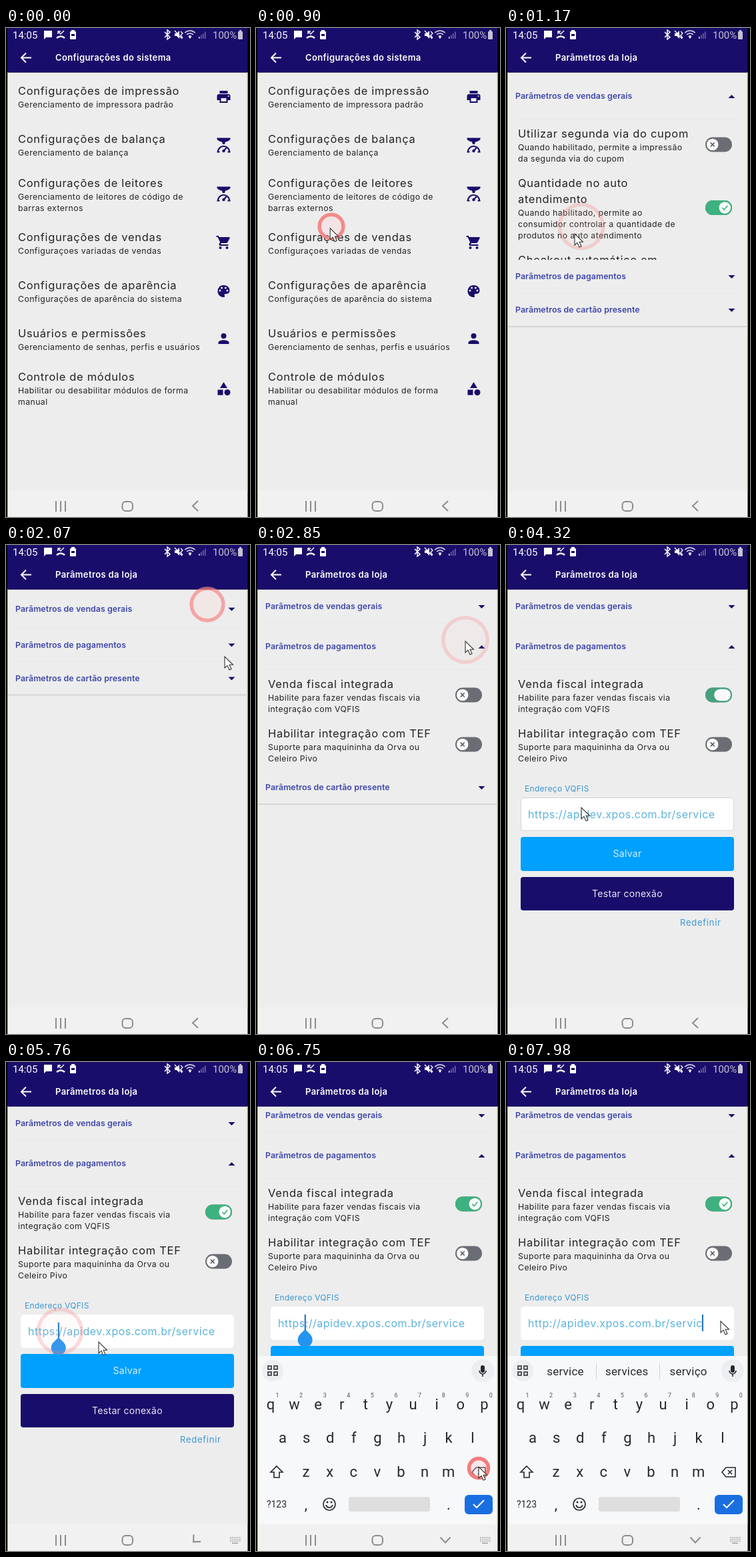
These frames come from a looping animation (366 by 732 pixels, 8000 ms). An HTML page with a canvas:

```html
<!DOCTYPE html>
<html lang="pt-BR">
<head>
<meta charset="utf-8">
<title>Parâmetros da loja</title>
<style>
html, body { margin: 0; width: 100%; height: 100%; overflow: hidden; background: #000; }
canvas { display: block; width: 366px; height: 732px; }
</style>
</head>
<body>
<canvas id="stage" width="366" height="732"></canvas>
<script>
const ctx = document.getElementById('stage').getContext('2d');
const LOOP = 8000;
const LEFT = 2, WIDTH = 360.5, BAR = 66.5;
const NAVY = '#190d6b', PAGE = '#ededed', INK = '#242424', LINK = '#3f48ab', BLUE = '#00a0ff';

const STYLES = {
  title: ['400 16.5px Inter, sans-serif', 0.68],
  sub: ['400 12.3px Inter, sans-serif', 0.41],
  bar: ['600 13px Inter, sans-serif', 0.38],
  panel: ['600 12.4px Inter, sans-serif', 0.06],
  label: ['400 12px Inter, sans-serif', 0.3],
  input: ['400 16px Inter, sans-serif', 0.5],
  button: ['400 14px Inter, sans-serif', 0.3],
  link: ['400 13px Inter, sans-serif', 0.75],
  status: ['400 15px Roboto, sans-serif', 0],
  suggest: ['400 17px Roboto, sans-serif', 0.2],
  key: ['400 22px Roboto, sans-serif', 0],
  small: ['400 14px Roboto, sans-serif', 0],
  hint: ['400 9px Roboto, sans-serif', 0]
};

// Timing
const clamp = v => Math.max(0, Math.min(1, v));
const lerp = (a, b, k) => a + (b - a) * k;
const linear = (t, from, to) => clamp((t - from) / (to - from));
const ease = (t, from, to) => { const k = linear(t, from, to); return k * k * (3 - 2 * k); };

const POINTER = [
  [480, 30, 298], [570, 112, 300], [720, 112, 300], [840, 112, 299], [1170, 103, 308],
  [1400, 112, 300], [1850, 302, 89], [1900, 302, 89], [2070, 328, 167], [2300, 326, 164],
  [2510, 314, 143], [2850, 314, 144], [3300, 318, 222], [3800, 318, 224], [4320, 113, 393],
  [4740, 75, 400], [5430, 77, 400], [5760, 139, 419], [6510, 139, 419], [6700, 334, 606],
  [6900, 334, 606], [7300, 304, 390], [7450, 304, 390], [7980, 322, 388]
];
const CLICKS = [
  [840, 113, 297], [1900, 302, 89], [2510, 314, 142], [3760, 318, 224],
  [5430, 81, 403], [6750, 334, 608], [7330, 304, 391]
];

// Drawing helpers
function group(draw, alpha = 1) {
  ctx.save();
  ctx.globalAlpha *= alpha;
  draw();
  ctx.restore();
}
function clipped(x, y, w, h, draw, alpha) {
  group(() => { ctx.beginPath(); ctx.rect(x, y, w, h); ctx.clip(); draw(); }, alpha);
}
function box(x, y, w, h, color, r = 0) {
  ctx.fillStyle = color;
  ctx.beginPath();
  ctx.roundRect(x, y, w, h, r);
  ctx.fill();
}
function disc(x, y, r, color) {
  ctx.fillStyle = color;
  ctx.beginPath();
  ctx.arc(x, y, r, 0, 7);
  ctx.fill();
}
function ring(x, y, r, color, width = 1.5, from = 0, to = Math.PI * 2) {
  ctx.strokeStyle = color;
  ctx.lineWidth = width;
  ctx.beginPath();
  ctx.arc(x, y, r, from, to);
  ctx.stroke();
}
function shape(d, x, y, color, scale = 1) {
  group(() => { ctx.translate(x, y); ctx.scale(scale, scale); ctx.fillStyle = color; ctx.fill(new Path2D(d)); });
}
function stroke(d, x, y, color, width = 2) {
  group(() => {
    ctx.translate(x, y);
    ctx.strokeStyle = color;
    ctx.lineWidth = width;
    ctx.stroke(new Path2D(d));
  });
}
function setStyle(name) {
  [ctx.font, ctx.letterSpacing] = [STYLES[name][0], STYLES[name][1] + 'px'];
}
// y is the optical middle of the line
function text(str, x, y, style, color = INK, align = 'left') {
  setStyle(style);
  ctx.fillStyle = color;
  ctx.textAlign = align;
  ctx.textBaseline = 'alphabetic';
  ctx.fillText(str, x, y + parseFloat(STYLES[style][0].slice(4)) * 0.36);
}

// Menu icons, drawn around their centre
const ICONS = {
  print(x, y) {
    shape('M-6 -9H6V-5H-6ZM-10 -1Q-10 -4 -7 -4H7Q10 -4 10 -1V5H6V9H-6V5H-10Z', x, y, NAVY);
    box(x - 4, y + 2, 8, 5, PAGE);
    disc(x + 7, y - 1, 1, PAGE);
  },
  scale(x, y) {
    shape('M-10 -10.5H10V-8.5Q8 -5.5 2.5 -4.5L1.5 -1H-1.5L-2.5 -4.5Q-8 -5.5 -10 -8.5Z', x, y, NAVY);
    stroke('M-9 11.5A9 9.5 0 0 1 9 11.5M0 9L4 4.5M-10 10.5H-6M6 10.5H10', x, y, NAVY, 2.2);
    disc(x, y + 9, 2.2, NAVY);
  },
  cart(x, y) {
    shape('M-11 -10V-8H-9L-5.4 -.4L-6.8 2C-7.5 3.4 -6.5 5 -5 5H7V3H-4.6L-3.5 1H3.9Q5.2 1 5.7 0L9.2 -6.5Q9.6 -8 8.4 -8H-6.8L-7.7 -10Z', x, y, NAVY);
    disc(x - 5, y + 8, 2, NAVY);
    disc(x + 5, y + 8, 2, NAVY);
  },
  palette(x, y) {
    shape('M0 -9C-12 -9 -12 9 0 9C3 9 1 6.5 1 5.5Q1 4 3 4H4C8 4 9 1 9 -1C9 -6 5 -9 0 -9Z', x, y, NAVY);
    for (const [dx, dy] of [[-5.5, -1], [-2.8, -5], [2.8, -5], [5.5, -1]]) disc(x + dx, y + dy, 1.5, PAGE);
  },
  person(x, y) {
    disc(x, y - 4, 4, NAVY);
    shape('M-8 8V6C-8 1 8 1 8 6V8Z', x, y, NAVY);
  },
  category(x, y) {
    shape('M0 -10L5.5 -1H-5.5ZM-9 1.5H-1V9.5H-9Z', x, y, NAVY);
    disc(x + 5.5, y + 5.5, 4.5, NAVY);
  }
};

const MENU = [
  [94, 103, 'print', 'Configurações de impressão', 'Gerenciamento de impressora padrão'],
  [166, 175, 'scale', 'Configurações de balança', 'Gerenciamento de balança'],
  [232, 248, 'scale', 'Configurações de leitores', 'Gerenciamento de leitores de código de', 'barras externos'],
  [313, 321, 'cart', 'Configurações de vendas', 'Configuraçoes variadas de vendas'],
  [385, 394, 'palette', 'Configurações de aparência', 'Configurações de aparência do sistema'],
  [457, 465, 'person', 'Usuários e permissões', 'Gerenciamento de senhas, perfis e usuários'],
  [522, 540, 'category', 'Controle de módulos', 'Habilitar ou desabilitar módulos de forma', 'manual']
];

function appBar(title) {
  box(LEFT, 0, WIDTH, BAR, NAVY);
  stroke('M16 0H1M8 -7L1 0L8 7', 22, 44.5, '#fff', 2);
  text(title, 74, 44.5, 'bar', '#fff');
}

function statusBar() {
  text('14:05', 10, 10.5, 'status', '#fff');
  shape('M-6 -6H6V4H-3L-6 7Z', 63, 10, '#fff');
  stroke('M-4 -5L0 -1L5 -6M-4 -1V-5H0', 82, 10, '#fff', 1.4);
  stroke('M-6 5Q0 0 6 5', 82, 10, '#fff', 2.6);
  box(96, 5, 9, 12, '#fff', 1);
  box(98, 3, 5, 3, '#fff');
  box(98, 9, 5, 3, NAVY);
  stroke('M-4 -4L4 4L0 7V-7L4 -4L-4 4', 242, 10, '#fff', 1.5);
  shape('M-6 -2H-3L1 -6V6L-3 2H-6Z', 259, 10, '#fff');
  stroke('M-6 -6L5 6M3 -5L6 -2L3 1L6 5', 259, 10, '#fff', 1.3);
  for (const r of [3, 7, 11]) ring(276, 15, r, '#d8d6e6', 1.6, -2.35, -0.8);
  disc(276, 14, 1.5, '#fff');
  for (let i = 0; i < 4; i++) box(289 + i * 3, 13 - i * 2.5, 1.6, 3 + i * 2.5, i < 1 ? '#ccc' : '#6c659c');
  text('100%', 310, 10.5, 'status', '#c4c2cf');
  box(348, 5, 7, 12, '#c4c2cf', 1);
  box(350, 3, 3, 3, '#c4c2cf');
}

function menuPage() {
  box(LEFT, BAR, WIDTH, 692 - BAR, PAGE);
  for (const [y, iconY, icon, title, ...subs] of MENU) {
    text(title, 18, y, 'title');
    subs.forEach((line, i) => text(line, 18, y + 21 + i * 17, 'sub'));
    ICONS[icon](326.5, iconY);
  }
  appBar('Configurações do sistema');
}

function toggle(x, y, on) {
  box(x - 20, y - 11, 40, 22, '#6b6d75', 11);
  group(() => box(x - 20, y - 11, 40, 22, '#3db17f', 11), on);
  const left = lerp(x - 18, x + 0.5, clamp(on * 1.6 - 0.6));
  const right = lerp(x - 0.5, x + 18, clamp(on * 1.6));
  box(left, y - 8.75, right - left, 17.5, '#fafafa', 8.75);
  const mid = (left + right) / 2;
  if (on < 0.3) stroke('M-3 -3L3 3M3 -3L-3 3', mid, y, '#55575f', 1.6);
  if (on > 0.9) stroke('M-4 0L-1 3L4 -3', mid, y, '#3db17f', 1.6);
}

function setting(y, titles, subs, on) {
  const extra = 24 * (titles.length - 1);
  titles.forEach((line, i) => text(line, 18, y + i * 24.5, 'title'));
  subs.forEach((line, i) => text(line, 18, y + extra + 21 + i * 17, 'sub'));
  if (on !== undefined) toggle(319, y + (extra ? 37 : 16.5), on);
}

function panelHeader(name, y, turn) {
  text(name, 14, y, 'panel', LINK);
  group(() => {
    ctx.translate(338.5, y + 0.5);
    ctx.rotate(-Math.PI * turn);
    shape('M-5 -2.5H5L0 2.5Z', 0, 0, NAVY);
  });
}

function addressForm(t, y) {
  let value = 'https://apidev.xpos.com.br/service';
  if (t >= 6780) value = value.replace('s:', ':');
  if (t >= 7800) value = value.slice(0, -1);
  const focused = t >= 5500;
  text('Endereço VQFIS', 28, y, 'label', '#3a97d3');
  box(22, y + 13, 320, 50, focused ? '#fff' : '#d5d5d5', 5);
  box(23, y + 14, 318, 48, '#fff', 4);
  text(value, 33, y + 38, 'input', '#5cb3dc');
  if (focused) {
    const at = t >= 7400 ? value.length : t >= 6780 ? 4 : t >= 6300 ? 5 : 6;
    setStyle('input');
    const x = 33 + ctx.measureText(value.slice(0, at)).width;
    box(x - 1, y + 25, 2.2, 25, '#2878c0');
    if (t < 6780) {
      shape('M0 -16C4 -11 11 -8 11 0A11 11 0 0 1 -11 0C-11 -8 -4 -11 0 -16Z', x, y + 63, '#2494ee');
    }
  }
  box(22, y + 72, 320, 51, BLUE, 4);
  text('Salvar', 182, y + 97, 'button', '#d5efff', 'center');
  box(22, y + 132, 320, 50, NAVY, 4);
  text('Testar conexão', 182, y + 157, 'button', '#e8e6f4', 'center');
  text('Redefinir', 261, y + 200, 'link', '#3a97d3');
}

function storePage(t) {
  const head1 = 1 - ease(t, 1960, 2150), shown1 = 1 - ease(t, 1900, 2060);
  const open2 = ease(t, 2570, 2770);
  const form = ease(t, 4020, 4240);
  const fiscal = linear(t, 4080, 4400);
  const body1 = 210 * shown1, body2 = open2 * lerp(151, 383, form);
  const scroll = -12 * ease(t, 5800, 6030);

  box(LEFT, BAR, WIDTH, 692 - BAR, PAGE);
  group(() => {
    ctx.translate(0, scroll);
    panelHeader('Parâmetros de vendas gerais', 92 + 10 * head1, shown1);
    const top1 = 117 + 20 * head1, top2 = top1 + body1;
    box(14, top1 - 1, 338, 1, '#e7e7e7');
    if (body1 > 0) clipped(3, top1, 360, body1, () => {
      setting(top1 + 21, ['Utilizar segunda via do cupom'],
        ['Quando habilitado, permite a impressão', 'da segunda via do cupom'], 0);
      setting(top1 + 95, ['Quantidade no auto', 'atendimento'],
        ['Quando habilitado, permite ao', 'consumidor controlar a quantidade de', 'produtos no auto atendimento'], 1);
      setting(top1 + 210, ['Checkout automático em'], []);
    });

    panelHeader('Parâmetros de pagamentos', top2 + 25 + 10 * open2, open2);
    const start = top2 + 50 + 20 * open2, end = start + body2;
    box(14, start - 1, 338, 1, '#e7e7e7');
    if (body2 > 0) clipped(3, start, 360, body2, () => {
      setting(start + 21, ['Venda fiscal integrada'],
        ['Habilite para fazer vendas fiscais via', 'integração com VQFIS'], fiscal);
      setting(start + 95, ['Habilitar integração com TEF'],
        ['Suporte para maquininha da Orva ou', 'Celeiro Pivo'], 0);
      if (form > 0) group(() => addressForm(t, start + 178), form);
    });
    if (form < 1) group(() => {
      panelHeader('Parâmetros de cartão presente', end + 25, 0);
      box(LEFT, end + 49, WIDTH, 2, '#d6d6d6');
    }, 1 - form);
  });
  appBar('Parâmetros da loja');
}

function keyboard(t) {
  const rise = ease(t, 5790, 6010);
  if (!rise) return;
  const dark = '#26282c';
  clipped(LEFT, BAR, WIDTH, 692 - BAR, () => {
    ctx.translate(0, 252 * (1 - rise));
    box(LEFT, 440, WIDTH, 252, '#f7f8fa');
    disc(25, 462, 16, '#eceef1');
    disc(340, 462, 17, '#eceef1');
    for (const dx of [0, 9]) for (const dy of [0, 9]) stroke('M0 0H5V5H0Z', 18 + dx, 455 + dy, dark, 1.5);
    box(337, 454, 6, 11, dark, 3);
    stroke('M-5 0A5 5 0 0 0 5 0M0 5V9', 340, 462, dark, 1.6);
    if (t >= 7420) {
      ['service', 'services', 'serviço'].forEach((word, i) => text(word, 89 + i * 92.3, 463, 'suggest', dark, 'center'));
      box(135, 451, 1, 24, '#cfd1d5');
      box(230, 451, 1, 24, '#cfd1d5');
    }
    const row = (keys, x, y) => [...keys].forEach((k, i) => text(k, x + i * 35.6, y, 'key', dark, 'center'));
    row('qwertyuiop', 22, 512);
    row('asdfghjkl', 40, 562);
    row('zxcvbnm', 75, 613);
    [...'1234567890'].forEach((n, i) => text(n, 32 + i * 35.6, 499, 'hint', '#555', 'center'));
    stroke('M0 -9L9 0H4V8H-4V0H-9Z', 31, 614, dark, 1.6);
    stroke('M-10 0L-4 -7H10V7H-4ZM-1 -3L5 3M5 -3L-1 3', 334, 614, dark, 1.6);
    text('?123', 31, 662, 'small', dark, 'center');
    text(',', 75, 662, 'key', dark, 'center');
    ring(110, 662, 9, dark, 1.7);
    disc(107, 659, 1.4, dark);
    disc(113, 659, 1.4, dark);
    ring(110, 662, 5, dark, 1.7, 0.2, 2.94);
    box(139, 651, 122, 22, '#dedede', 3);
    text('.', 289, 662, 'key', dark, 'center');
    box(313, 648, 42, 29, '#1a6fe0', 6);
    stroke('M-8 0L-3 5L8 -6', 334, 662, '#fff', 2);
  });
}

function navBar(t) {
  const turn = ease(t, 5640, 5880);
  box(LEFT, 692, WIDTH, 40, '#f1f1f1');
  for (let i = 0; i < 3; i++) box(74 + i * 7, 708, 2, 16, '#8c8c8c');
  ctx.strokeStyle = '#8c8c8c';
  ctx.lineWidth = 2;
  ctx.beginPath();
  ctx.roundRect(174.5, 709, 15.5, 14, 5);
  ctx.stroke();
  group(() => {
    ctx.translate(284, 715.5);
    ctx.rotate(-Math.PI / 2 * turn);
    stroke('M4 -7.5L-4 0L4 7.5', 0, 0, '#8c8c8c', 2);
  });
  if (t >= 5640) {
    for (let r = 0; r < 3; r++) for (let c = 0; c < 6; c++) box(336 + c * 2.8, 711 + r * 2.8, 1.5, 1.5, '#a0a0a0');
    box(339, 719.5, 9, 1.5, '#a0a0a0');
  }
}

function pointer(t) {
  for (const [start, x, y] of CLICKS) {
    const age = t - start;
    if (age < 0 || age > 450) continue;
    const r = 16.5 + age * 0.055;
    group(() => {
      disc(x, y, r, 'rgba(255,200,200,.3)');
      ring(x, y, r - 2, '#f47c7c', 5.5);
    }, 1 - age / 450);
  }
  if (t < POINTER[0][0]) return;
  const next = POINTER.findIndex(p => p[0] > t);
  const b = POINTER.at(next), a = next > 0 ? POINTER[next - 1] : b;
  const k = ease(t, a[0], b[0]);
  const x = lerp(a[1], b[1], k), y = lerp(a[2], b[2], k);
  const arrow = 'M0 0V17L4 13.3L7 20L10 18.7L7.2 12.3H12.5Z';
  shape(arrow, x, y, '#fff');
  stroke(arrow, x, y, '#333', 1.1);
}

function render(t) {
  box(0, 0, 366, 732, '#000');
  const enter = ease(t, 900, 1080);
  if (enter < 1) menuPage();
  if (enter > 0) group(() => storePage(t), enter);
  keyboard(t);
  navBar(t);
  statusBar();
  box(LEFT, BAR, 1, 732 - BAR, '#b4cc3c');
  box(361.5, BAR, 1, 692 - BAR, '#c3d07a');
  pointer(t);
}

const began = performance.now();
function tick() {
  render((performance.now() - began) % LOOP);
  requestAnimationFrame(tick);
}
tick();
</script>
</body>
</html>
```
